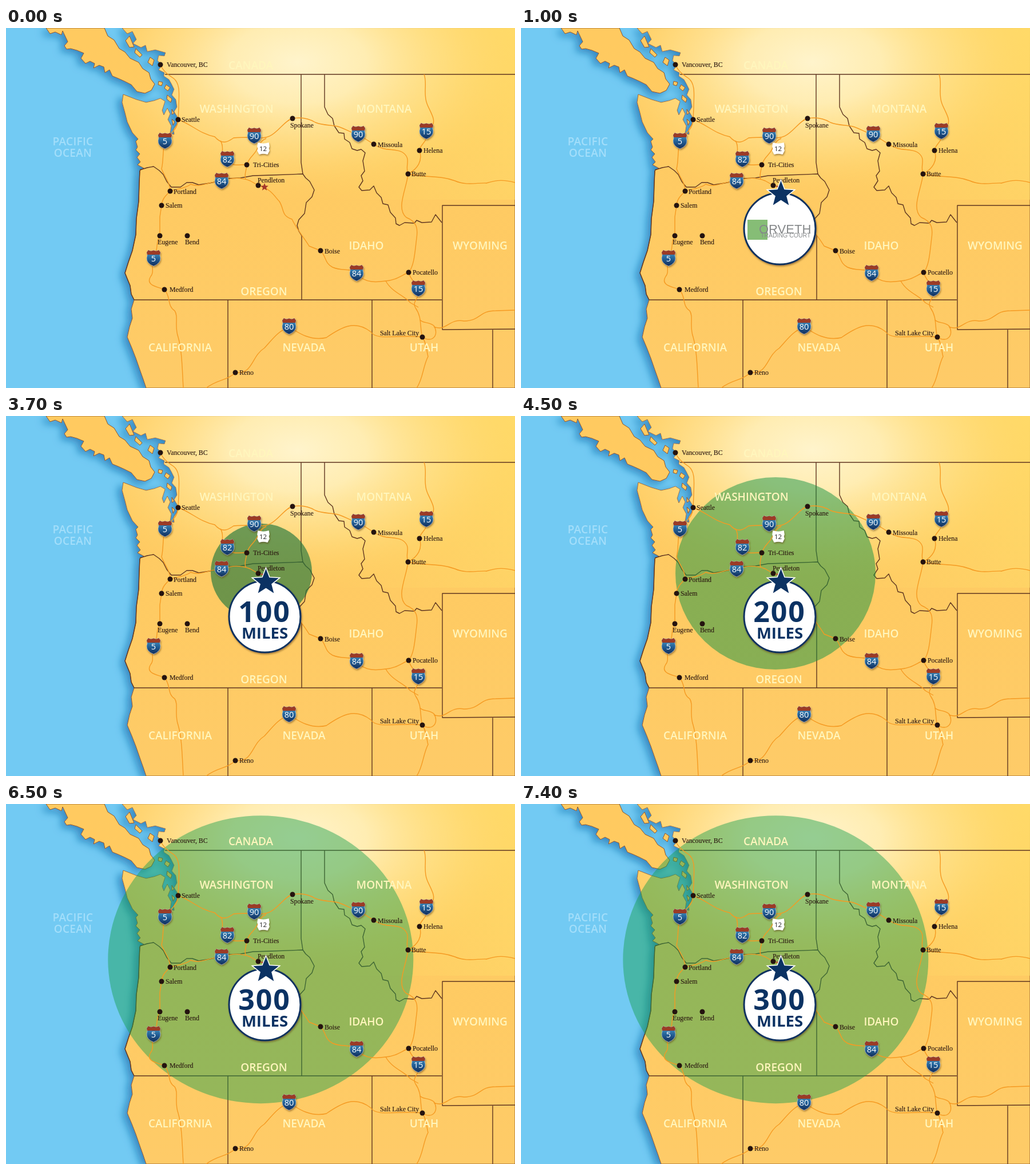
These frames come from a looping animation (890 by 629 pixels, 8000 ms). An HTML page:

```html
<!DOCTYPE html>
<html lang="en">
<head>
<meta charset="utf-8">
<title>Distance map</title>
<style>
html, body { margin: 0; width: 100%; height: 100%; overflow: hidden; background: #72caf3; }
svg { display: block; width: 890px; height: 629px; }
.land { fill: url(#landFill); stroke: #8a5526; stroke-width: 1; stroke-linejoin: round; }
.borders { fill: none; stroke: #5f3620; stroke-width: 1.4; stroke-linejoin: round; }
.roads { fill: none; stroke: #f59a22; stroke-width: 1.4; stroke-linejoin: round; }
.state { font: 600 19px "Open Sans", sans-serif; fill: #fff6bd; text-anchor: middle; }
.ocean { fill: #a3defa; letter-spacing: .3px; }
.city { font: 11.8px "Liberation Serif", serif; fill: #2b1912; stroke: #2b1912; stroke-width: .15; }
.number { font: 14.5px "Open Sans", sans-serif; fill: #fff; text-anchor: middle; }
.badge { font-family: "Open Sans", sans-serif; font-weight: 700; fill: #0b3263; text-anchor: middle; }
.logo { font-family: "Liberation Sans", sans-serif; fill: #85888a; }
</style>
</head>
<body>
<svg viewBox="0 0 890 629">
  <defs>
    <linearGradient id="landFill" gradientUnits="userSpaceOnUse" x1="0" y1="0" x2="0" y2="629">
      <stop offset="0" stop-color="#ffca60"/><stop offset="1" stop-color="#fecb67"/>
    </linearGradient>
    <radialGradient id="glow" gradientUnits="userSpaceOnUse" cx="0" cy="0" r="1"
      gradientTransform="translate(510 60) scale(400 240)">
      <stop offset="0" stop-color="#fff4cc"/>
      <stop offset=".3" stop-color="#fff0bb" stop-opacity=".9"/>
      <stop offset=".65" stop-color="#ffe38e" stop-opacity=".55"/>
      <stop offset="1" stop-color="#ffd566" stop-opacity="0"/>
    </radialGradient>
    <linearGradient id="east" gradientUnits="userSpaceOnUse" x1="890" y1="0" x2="560" y2="290">
      <stop offset="0" stop-color="#ffda68"/><stop offset="1" stop-color="#ffda68" stop-opacity="0"/>
    </linearGradient>
    <linearGradient id="shieldFill" x1="0" y1="0" x2="0" y2="1">
      <stop offset=".25" stop-color="#3a82b3"/><stop offset=".55" stop-color="#235f96"/>
      <stop offset="1" stop-color="#122c58"/>
    </linearGradient>
    <clipPath id="mainlandClip"><use href="#mainland"/></clipPath>
    <filter id="coastShadow" x="-10%" y="-10%" width="120%" height="120%">
      <feDropShadow dx="-7" dy="5" stdDeviation="7" flood-color="#1568a8" flood-opacity=".65"/>
    </filter>
    <filter id="softShadow" x="-30%" y="-30%" width="160%" height="160%">
      <feDropShadow dx="1" dy="2" stdDeviation="1.6" flood-color="#5a3a10" flood-opacity=".55"/>
    </filter>
    <g id="shield" filter="url(#softShadow)">
      <path fill="url(#shieldFill)" stroke="#dbe3e3" stroke-width=".5" d="M-9-15Q-5-12 0-14.5Q5-12 9-15L12-11Q10-7 12-2Q13 8 0 13Q-13 8-12-2Q-10-7-12-11Z"/>
      <path fill="#9b3b27" d="M-9-15Q-5-12 0-14.5Q5-12 9-15L12-11L11-7H-11L-12-11Z"/>
    </g>
  </defs>

  <rect width="890" height="629" fill="#72caf3"/>
  <g class="land" filter="url(#coastShadow)">
    <path d="M70 0L77 10 86 7 97 12 99 5 108 24 102 31 106 37 113 36 124 39 136 44 131 53 139 62 147 58 155 62 153 70 163 65 171 68 173 78 181 73 186 84 196 88 207 93 219 99 229 111 243 114 254 109 260 98 253 89 250 78 239 71 232 60 217 53 208 42 198 36 189 21 178 14 172 0Z"/>
    <path id="mainland" d="M203 0L212 10 221 6 228 20 222 27 236 34 244 30 247 41 261 38 279 43 277 49 267 48 265 57 273 65 267 73 277 78 276 84 285 90 289 97 294 107 290 117 297 125 299 138 294 146 300 156 299 168 293 177 294 186 287 184 289 171 283 160 287 150 282 140 276 152 273 144 278 128 270 123 259 127 245 130 228 125 205 116 203 130 208 148 212 164 221 183 231 194 227 198 230 208 227 213 234 220 229 226 235 234 230 239 241 245 234 249 233 270 232 303 228 333 227 361 221 389 214 409 208 428 212 438 217 450 219 465 224 475 219 491 221 507 216 522 212 540 220 559 227 577 235 600 240 614 245 629H890V0Z"/>
    <path d="M216 14L224 33 216 34 209 22ZM227 36L238 47 234 51 225 43ZM252 51L259 56 256 66 248 60ZM267 93L274 95 272 101 266 99ZM280 99L287 104 283 110 277 105ZM282 117L290 124 288 130 281 124ZM290 142L294 149 290 151ZM290 159L295 164 292 170Z"/>
  </g>
  <g clip-path="url(#mainlandClip)">
    <rect width="890" height="300" fill="url(#east)"/>
    <rect width="890" height="310" fill="url(#glow)"/>
  </g>

  <g class="borders">
    <path d="M278 81H890M516 81V235L519 255M224 475H762M388 475V629M640 475V629M890 310H763V527L890 526M851 527V629"/>
    <path d="M234 248L247 244 258 242 268 249 275 256 281 268 289 278 305 278 316 270 326 270 337 274 356 271 370 268 386 263 410 262 432 258 465 257 519 255 524 262 531 268 539 283 535 295 525 305 522 324 512 335 509 345 512 355 517 363V475"/>
    <path d="M557 81V138L563 151 571 158 574 171 582 183 591 184 592 194 601 200 605 211 614 214 621 212 628 218 624 232 627 250 621 258 624 267 617 278 622 284 636 283 643 276 648 288 656 296 659 307 668 309 672 322 681 332 682 342 688 345 697 340 714 341 718 336 727 340 744 339 751 326 762 340"/>
    <path d="M234 249L233 270 232 303 228 333 227 361 221 389 214 409 208 428 212 438 217 450 219 465 224 475"/>
  </g>

  <ellipse id="range"/>

  <g class="roads">
    <path d="M270 64C275 76 284 82 293 88C306 98 302 120 302 138L301 160C300 180 285 183 278 198C273 216 276 230 272 246C278 262 287 270 287 285C278 294 273 299 272 310L269 330V363C261 376 267 388 258 403C253 417 260 426 253 434C243 450 265 452 277 457C289 470 281 485 295 494C302 505 294 520 301 540C308 565 308 595 310 629"/>
    <path d="M301 160C324 168 339 185 365 190C378 205 388 199 398 192C412 190 423 193 434 189C468 203 480 164 501 158C519 155 531 159 541 165C556 171 569 169 580 172C596 177 604 184 616 186L643 203C663 217 678 209 693 217C710 228 697 240 703 255C733 262 759 257 785 267C805 276 825 270 840 271C859 265 872 265 890 270"/>
    <path d="M375 197C384 211 371 219 387 230C397 245 410 237 421 239C421 248 416 254 419 264M421 239C427 222 433 225 440 210C444 200 449 195 455 193"/>
    <path d="M287 285C299 281 313 281 323 273C341 280 359 266 377 268C398 259 414 262 427 267L441 275C464 281 470 295 478 303C487 317 481 328 500 334C509 353 521 366 530 381L550 389C560 399 557 411 571 418C590 426 600 418 613 429C628 447 650 444 664 442C681 441 690 433 704 427M664 442C675 462 696 467 707 480L721 488"/>
    <path d="M731 81C737 97 729 114 736 132C741 146 754 162 744 172L735 181C740 198 724 202 723 214C729 232 720 246 703 255C701 279 681 316 700 331C720 339 720 352 718 367C715 390 714 416 704 427C707 440 717 445 721 456C728 469 708 476 716 489C728 506 723 522 728 540C737 554 735 565 738 574C729 591 729 614 718 629"/>
    <path d="M350 629C371 613 386 617 401 602C433 605 428 574 452 559C466 544 474 531 495 522C513 534 533 547 560 541C586 523 610 509 638 531C648 547 686 535 728 540C746 552 758 535 748 520C739 513 728 516 724 510M748 522C770 531 774 507 801 512C831 511 827 494 856 494L890 493"/>
  </g>
  <g id="labels"></g>

  <g id="callout">
    <circle cx="452.5" cy="350.5" r="62.5" fill="#fff" stroke="#0d315f" stroke-width="3" filter="url(#softShadow)"/>
    <g id="logo" class="logo">
      <rect x="396" y="335" width="35" height="35" fill="#86bd76"/>
      <text x="416" y="359" font-size="22">ORVETH</text>
      <text x="419" y="366" font-size="10.5">TRADING COURT</text>
    </g>
    <g id="miles" class="badge">
      <text id="distance" x="452" y="360" font-size="50" letter-spacing="2"></text>
      <text x="452.5" y="389" font-size="27.5">MILES</text>
    </g>
    <path id="bigStar" fill="#0b3263" stroke="#fff" stroke-width="3" paint-order="stroke"/>
  </g>
</svg>
<script>
const $ = id => document.getElementById(id);

const star = (cx, cy, r) => "M" + Array.from({ length: 10 }, (_, i) => {
  const radius = i % 2 ? r * 0.43 : r, angle = i * Math.PI / 5;
  return `${(cx + radius * Math.sin(angle)).toFixed(1)} ${(cy - radius * Math.cos(angle)).toFixed(1)}`;
}).join("L") + "Z";

const states = [
  ["CANADA", 428, 72], ["WASHINGTON", 403, 148], ["MONTANA", 661, 148], ["OREGON", 451, 467],
  ["IDAHO", 630, 387], ["WYOMING", 829, 387], ["CALIFORNIA", 304.5, 565], ["NEVADA", 521, 565],
  ["UTAH", 731, 565], ["PACIFIC", 117, 205, "ocean"], ["OCEAN", 117, 225, "ocean"]
];
// name, dot position, label offset
const cities = [
  ["Vancouver, BC", 270, 64, 11, 4], ["Seattle", 301, 160, 6, 4], ["Spokane", 501, 158, -4, 16],
  ["Tri-Cities", 421, 239, 11, 4], ["Pendleton", 441, 275, -1, -5], ["Portland", 287, 285, 6, 5],
  ["Salem", 272, 310, 7, 4], ["Eugene", 269, 363, -4, 15], ["Bend", 317, 363, -4, 15],
  ["Medford", 277, 457, 9, 4], ["Boise", 550, 389, 7, 5], ["Missoula", 643, 203, 7, 5],
  ["Helena", 723, 214, 7, 4], ["Butte", 703, 255, 6, 4], ["Pocatello", 704, 427, 7, 4],
  ["Salt Lake City", 728, 540, -74, -3], ["Reno", 401, 602, 7, 4]
];
const shields = [
  [5, 278, 198], [90, 434, 189], [82, 387, 230], [84, 377, 268], [90, 616, 186],
  [15, 735, 181], [5, 258, 403], [84, 613, 429], [15, 721, 456], [80, 495, 522]
];

$("labels").innerHTML = [
  ...states.map(([name, x, y, kind = ""]) => `<text class="state ${kind}" x="${x}" y="${y}">${name}</text>`),
  ...shields.map(([n, x, y]) =>
    `<use href="#shield" x="${x}" y="${y}"/><text class="number" x="${x}" y="${y + 5}">${n}</text>`),
  `<path d="M441 201Q450 204 459 201L460 207Q458 210 460 214L457 220Q450 218 443 220L440 214Q442 210 440 207Z"
    fill="#fff" stroke="#fff" stroke-width="1.5" filter="url(#softShadow)"/>
   <text class="number" x="449.5" y="215" style="font-size:11.5px;fill:#222">12</text>`,
  ...cities.map(([name, x, y, dx, dy]) =>
    `<circle cx="${x}" cy="${y}" r="4.5" fill="#24130f"/><text class="city" x="${x + dx}" y="${y + dy}">${name}</text>`),
  `<path d="${star(452, 278, 7)}" fill="#a3372a"/>`
].join("");
$("bigStar").setAttribute("d", star(454.5, 290.5, 23.5));

const scenes = [
  { start: 0 },
  { start: 1000, logo: true },
  { start: 2500, miles: 100, range: [446.5, 272.5, 88.5, 84.5], fill: "rgba(35,121,62,.65)" },
  { start: 4500, miles: 200, range: [445, 275, 175, 168], fill: "rgba(21,148,68,.5)" },
  { start: 6500, miles: 300, range: [445.3, 271.7, 267, 251.5], fill: "rgba(22,157,76,.45)" }
];
const show = (id, on) => { $(id).style.display = on ? "" : "none"; };
let current;

function render(now) {
  const scene = scenes.findLast(s => s.start <= now % 8000);
  if (scene !== current) {
    current = scene;
    show("callout", scene.logo || scene.miles);
    show("logo", scene.logo);
    show("miles", scene.miles);
    show("range", scene.range);
    if (scene.miles) {
      $("distance").textContent = scene.miles;
      ["cx", "cy", "rx", "ry"].forEach((key, i) => $("range").setAttribute(key, scene.range[i]));
      $("range").setAttribute("fill", scene.fill);
    }
  }
  requestAnimationFrame(render);
}
render(performance.now());
</script>
</body>
</html>
```
